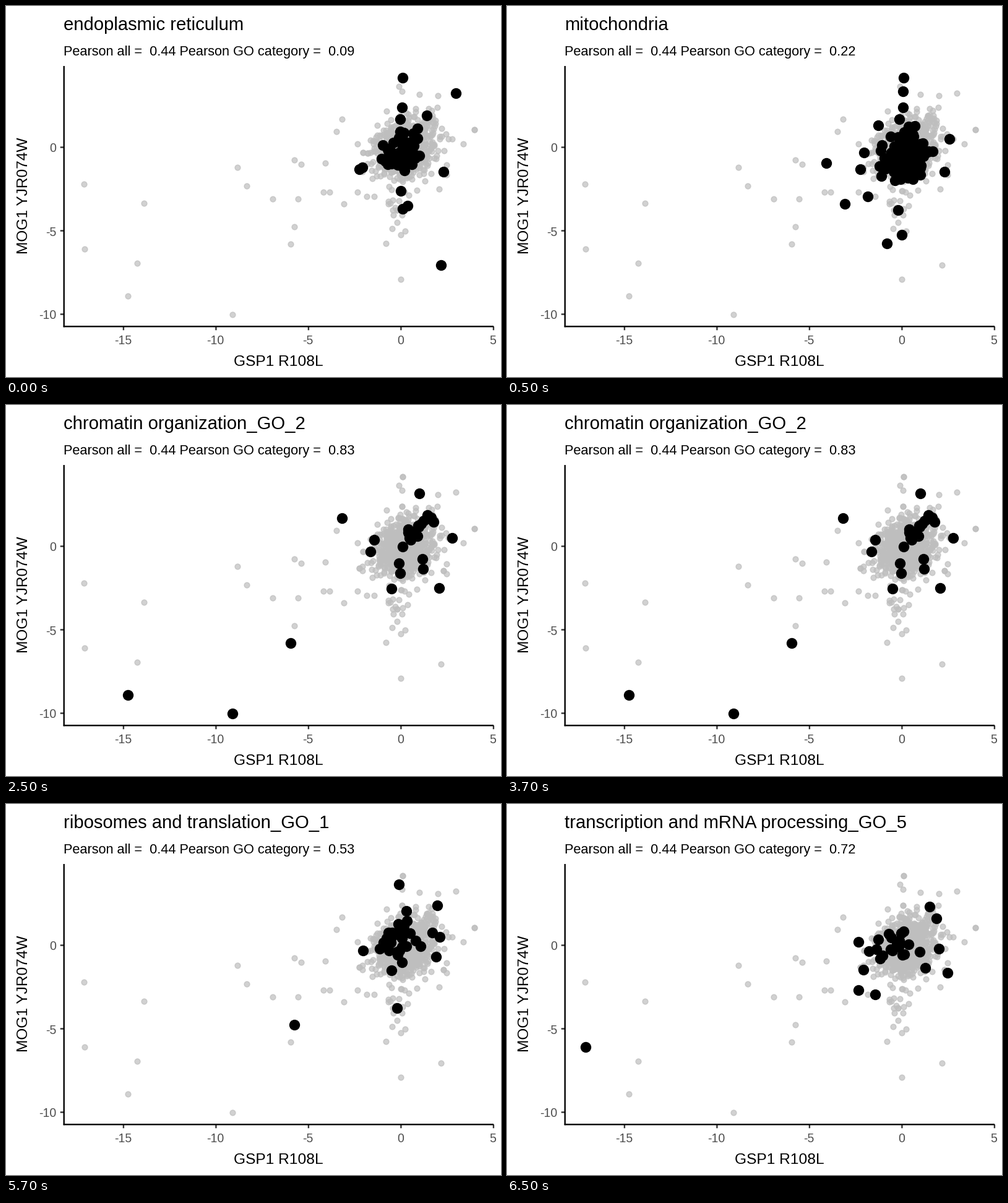
A matplotlib script that plays this animation: 800 px wide and 600 px high, repeating every 8 s.

```python
import numpy as np
import matplotlib.pyplot as plt
from matplotlib.animation import FuncAnimation

WIDTH, HEIGHT, DPI = 800, 600, 160
STEP, LOOP = 500, 8000
LEFT, RIGHT, TOP, BOTTOM = 93.7, 788, 97, 518.3
ORIGIN, UNIT = np.array([638.4, 228.5]), np.array([29.9, -27])
LINE, TICK = 1.07, 6

plt.rcParams["font.family"] = "Liberation Sans"
rng = np.random.default_rng(7)


def to_stage(points):
    """Data values to stage pixels, y downwards."""
    return ORIGIN + UNIT * np.array(points)


def cloud(center, spread, corr, count, limit=2):
    """Tilted normal cloud without its far tails."""
    u = rng.normal(size=(4 * count, 2))
    u = u[np.hypot(*u.T) < limit][:count]
    tilted = corr * u[:, 0] + np.sqrt(1 - corr ** 2) * u[:, 1]
    return center + spread * np.column_stack([u[:, 0], tilted])


def group(outliers, *cluster):
    return np.vstack([outliers, cloud(*cluster)])


reticulum = group(
    [(0.1, 4.15), (2.95, 3.25), (0.05, 2.4), (1.4, 1.9), (-0.05, 1.7),
     (-2.25, -1.3), (-2.1, -1.2), (2.3, -1.45), (0, -2.6), (0.35, -3.5),
     (0.1, -3.7), (2.15, -7.05)],
    (0.1, -0.2), (0.62, 0.8), 0.2, 62)
mitochondria = group(
    [(0.1, 4.15), (0.05, 3.35), (0.05, 2.4), (-0.15, 1.7), (-1.3, 1.3),
     (2.55, 0.5), (-2.05, -0.3), (-4.1, -0.95), (2.3, -1.45), (-2.25, -1.3),
     (-1.85, -2.95), (-3.1, -3.4), (-0.2, -3.75), (0, -5.25), (-0.8, -5.75)],
    (0.15, -0.45), (0.8, 0.95), 0.2, 95)
chromatin = group(
    [(1, 3.15), (-3.2, 1.7), (2.75, 0.5), (-1.45, 0.4), (-1.65, -0.3),
     (1.15, -0.75), (1.2, -1.35), (-0.1, -1), (-0.05, -1.6), (2.05, -2.5),
     (-0.5, -2.55), (-5.95, -5.8), (-14.75, -8.9), (-9.1, -10)],
    (0.8, 0.95), (0.6, 0.55), 0.85, 17)
ribosomes = group(
    [(-0.1, 3.65), (1.95, 2.4), (0.3, 2.05), (2.1, 0.5), (-2.05, -0.3),
     (1.9, -0.7), (0.05, -1), (-0.5, -1.5), (-0.2, -3.75), (-5.75, -4.75)],
    (0.2, 0.5), (0.95, 0.6), 0.3, 24, 1.8)
transcription = group(
    [(1.5, 2.3), (1.85, 1.6), (-2.35, 0.2), (2, -0.2), (1.25, -1.35),
     (-2.1, -1.45), (2.45, -1.65), (-2.35, -2.7), (-1.45, -2.95),
     (-17.1, -6.1)],
    (-0.25, 0), (0.9, 0.65), 0.1, 18, 1.8)

# start in ms, title, correlation, points
SCENES = [
    (0, "endoplasmic reticulum", "0.09", reticulum),
    (500, "mitochondria", "0.22", mitochondria),
    (2500, "chromatin organization_GO_2", "0.83", chromatin),
    (4500, "ribosomes and translation_GO_1", "0.53", ribosomes),
    (6500, "transcription and mRNA processing_GO_5", "0.72", transcription),
]

STRAYS = [(-17.15, -2.2), (-13.9, -3.35), (-14.25, -6.95), (-8.85, -1.2),
          (-8.35, -2.3), (-6.95, -3.1), (-5.55, -3.1), (-5.75, -0.75),
          (-5.4, -1), (-4.2, -2.7), (-3.85, -2.7), (-3.5, 0.95),
          (3.95, 1.05), (3.95, 1.05), (3.35, 0.2), (2, 3.1), (0, -7.9)]
background = np.vstack([STRAYS] + [scene[3] for scene in SCENES] + [
    cloud((0.15, 0), (0.5, 0.65), 0.2, 350),
    cloud((0.25, 0), (0.85, 0.9), 0.3, 400, 2.5),
    cloud((0.2, -0.1), (1.2, 1.4), 0.2, 70, 2.2),
    cloud((0.3, -3.5), (0.7, 0.9), 0, 16),
])

fig = plt.figure(figsize=(WIDTH / DPI, HEIGHT / DPI), dpi=DPI, facecolor="white")
ax = fig.add_axes([0, 0, 1, 1])
ax.set(xlim=(0, WIDTH), ylim=(HEIGHT, 0))
ax.axis("off")


def line(xs, ys, color):
    ax.plot(xs, ys, color=color, lw=LINE, solid_capstyle="butt", snap=False)


def label(x, y, text, size, **style):
    return ax.text(x, y, text, fontsize=size, va="baseline", **style)


def dots(points, size, **style):
    """Filled circle plus outline; size is in millimetres."""
    diameter = 0.75 * (size * 2.845 + 0.945)
    return ax.scatter(*to_stage(points).T, s=diameter ** 2, lw=0.71, **style)


dots(background, 1.5, color="#bebebe", alpha=0.7)
marked = dots(reticulum, 3, color="black")

for value in range(-15, 6, 5):
    x = to_stage((value, 0))[0]
    line([x, x], [BOTTOM, BOTTOM + TICK], "#333333")
    label(x - 0.8, 547, str(value), 8.8, color="#4d4d4d", ha="center")
for value in (0, -5, -10):
    y = to_stage((0, value))[1]
    line([LEFT - TICK, LEFT], [y, y], "#333333")
    label(81.5, y + 8, str(value), 8.8, color="#4d4d4d", ha="right")
line([LEFT, LEFT], [TOP, BOTTOM + 1], "black")
line([LEFT - 1, RIGHT], [BOTTOM, BOTTOM], "black")

label((LEFT + RIGHT) / 2 - 1, 582, "GSP1 R108L", 11, ha="center")
label(35.5, (TOP + BOTTOM) / 2 - 1.2, "MOG1 YJR074W", 11, ha="center",
      rotation=90, rotation_mode="anchor")
title = label(93, 39, "", 13.15)
subtitle = label(93, 80, "", 9.79)


def update(i):
    _, name, corr, points = [s for s in SCENES if s[0] <= i * STEP][-1]
    title.set_text(name)
    subtitle.set_text(f"Pearson all =  0.44 Pearson GO category =  {corr}")
    marked.set_offsets(to_stage(points))
    return title, subtitle, marked


anim = FuncAnimation(fig, update, frames=LOOP // STEP, interval=STEP,
                     repeat=True, repeat_delay=0)
plt.show()
```
